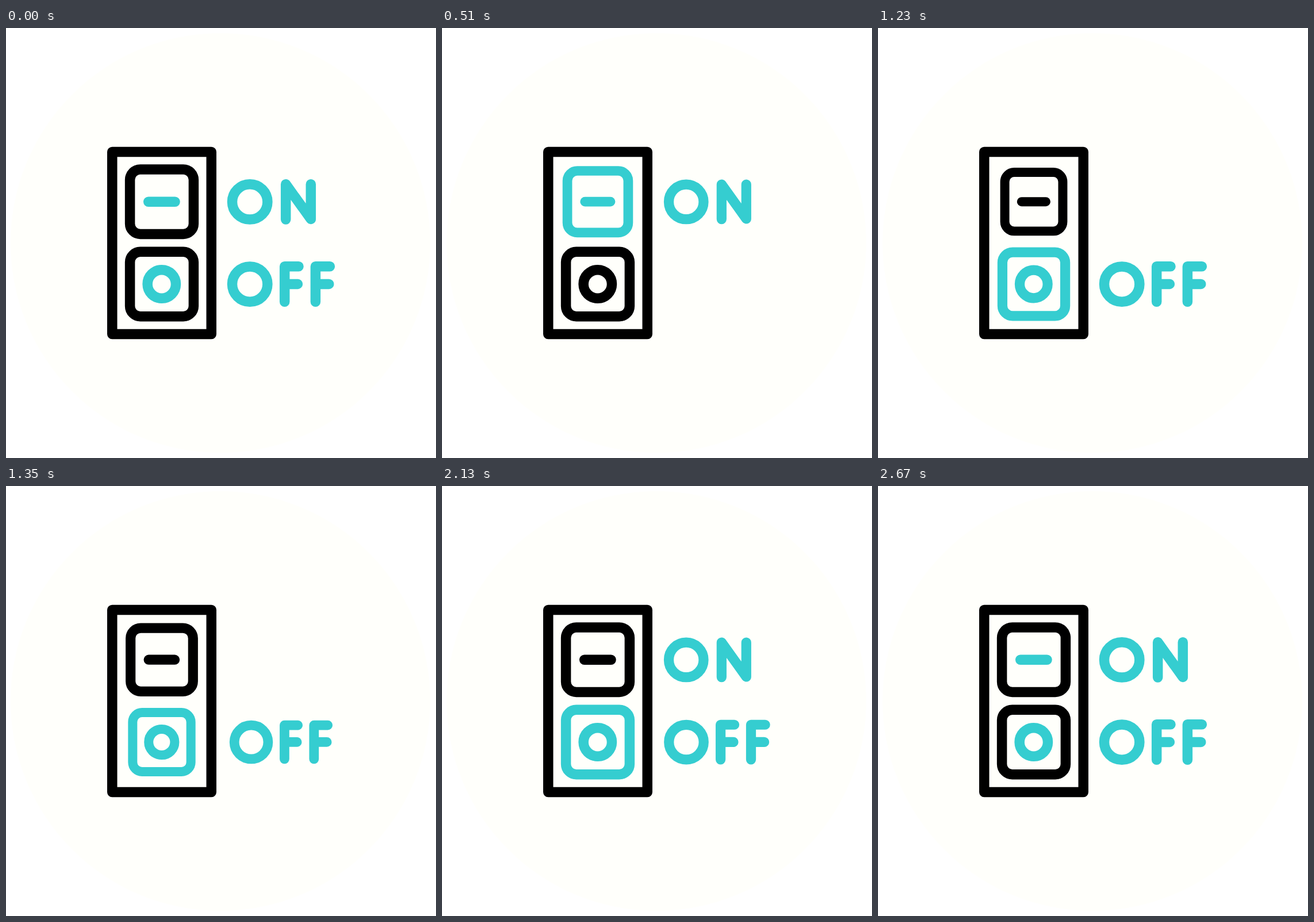
These frames come from a looping animation (748 px wide and 748 px high, 2.73 s). An HTML page:

```html
<!DOCTYPE html>
<html lang="en">
<head>
<meta charset="utf-8">
<title>On / off switch</title>
<style>
  html, body { margin: 0; width: 100%; height: 100%; overflow: hidden; background: #fff; }
  svg { display: block; width: 100vw; height: 100vh; }
  .line { fill: none; stroke: #000; stroke-width: 17.5; stroke-linecap: round; stroke-linejoin: round; }
  .lit { stroke: #35cdd0; }
</style>
</head>
<body>
<svg viewBox="0 0 748 748">
  <circle cx="373" cy="374" r="365" fill="#fffffb"/>
  <g class="line">
    <rect x="184.75" y="215.5" width="172.5" height="317"/>
    <g id="top">
      <rect id="topBox" class="line" x="215.6" y="246" width="110.8" height="112.4" rx="18"/>
      <path id="dash" class="line" d="M247.7 302.2H294"/>
    </g>
    <g id="bottom">
      <rect id="bottomBox" class="line" x="215.6" y="389.3" width="110.8" height="112.4" rx="18"/>
      <circle id="ring" class="line" cx="270.8" cy="445.5" r="24.7"/>
    </g>
    <g id="on" class="lit">
      <circle cx="424.2" cy="302.4" r="30.7"/>
      <path d="M486.7 333V271.7L530.3 332.4V271.7"/>
    </g>
    <g id="off" class="lit">
      <circle cx="424.2" cy="445.6" r="30.7"/>
      <path d="M484.7 476.3V414.8H509M484.7 445.4H507.4M538.4 476.3V414.8H563.4M538.4 445.4H561.8"/>
    </g>
  </g>
</svg>
<script>
const LOOP = 2730, STEP = 30, PULSE = 480, DEPTH = 0.1;
const TURN_ON = 330, TURN_OFF = 1170, SHOW_BOTH = 2010, RESET = 2370;

const el = id => document.getElementById(id);
const light = (id, lit) => el(id).classList.toggle('lit', lit);
const show = (id, visible) => { el(id).style.display = visible ? '' : 'none'; };

// Each part shrinks and recovers around its centre at the listed start times.
const parts = [
  { id: 'top', x: 271, y: 302.2, starts: [398, 940] },
  { id: 'bottom', x: 271, y: 445.5, starts: [1170] },
  { id: 'on', x: 462, y: 302.4, starts: [450, 2070] },
  { id: 'off', x: 478.5, y: 445.6, starts: [1240, 2070] }
];

function scaleAt(t, starts) {
  const start = starts.find(s => t > s && t < s + PULSE);
  if (start === undefined) return 1;
  return 1 - DEPTH * Math.sin(Math.PI * (t - start) / PULSE) ** 2;
}

function draw(t) {
  const isOn = t >= TURN_ON && t < TURN_OFF;
  const isOff = t >= TURN_OFF && t < RESET;
  light('topBox', isOn);
  light('dash', !isOff);
  light('bottomBox', isOff);
  light('ring', !isOn);
  show('on', t < TURN_OFF || t >= SHOW_BOTH);
  show('off', !isOn);
  for (const { id, x, y, starts } of parts) {
    const s = scaleAt(t, starts);
    el(id).setAttribute('transform', `translate(${x} ${y}) scale(${s}) translate(${-x} ${-y})`);
  }
}

const begin = performance.now();
function tick() {
  const t = (performance.now() - begin) % LOOP;
  draw(Math.floor(t / STEP) * STEP);
  requestAnimationFrame(tick);
}
tick();
</script>
</body>
</html>
```
